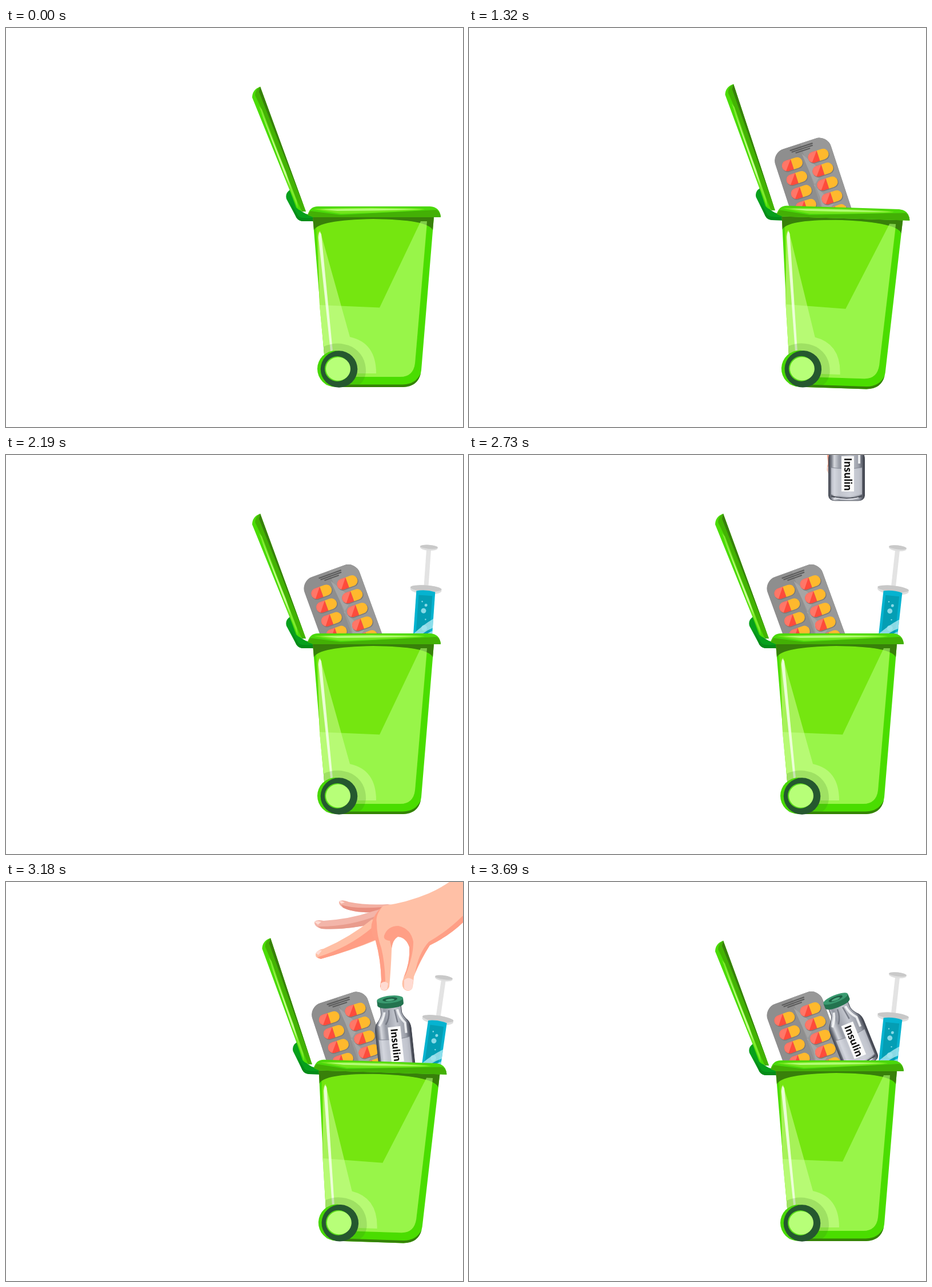
Recreate the animation shown at these times as an HTML page. Size 800 by 700 pixels, loop 3930 ms.

```html
<!DOCTYPE html>
<html lang="en">
<head>
<meta charset="utf-8">
<title>Medicine bin</title>
<style>
  html, body { margin: 0; width: 100%; height: 100%; overflow: hidden; background: #fff; }
  svg { display: block; width: 100%; height: 100%; }
  text { font: bold 17px "Open Sans", "Noto Sans", sans-serif; }
</style>
</head>
<body>
<svg viewBox="0 0 800 700">
  <defs>
    <linearGradient id="glass">
      <stop offset="0" stop-color="#3f434d"/>
      <stop offset=".08" stop-color="#7d818b"/>
      <stop offset=".16" stop-color="#d6d8de"/>
      <stop offset=".3" stop-color="#969aa4"/>
      <stop offset=".6" stop-color="#c3c6ce"/>
      <stop offset=".84" stop-color="#989ca6"/>
      <stop offset=".94" stop-color="#5d616c"/>
      <stop offset="1" stop-color="#33363f"/>
    </linearGradient>
    <clipPath id="blister"><rect x="-53" width="103" height="190" rx="22"/></clipPath>
    <g id="pill">
      <rect x="-18.500" y="-8" width="38" height="19" rx="9.500" fill="#7a7a7a"/>
      <path d="M0-9.500H-9A9.500 9.500 0 0 0-9 9.500H0Z" fill="#ff4b3b"/>
      <path d="M0-9.500H-9A9.500 9.500 0 0 0-14 8Z" fill="#ff7768"/>
      <path d="M0-9.500H9A9.500 9.500 0 0 1 9 9.500H0Z" fill="#ffb92d"/>
    </g>
  </defs>

  <g id="scene">
    <g id="pack">
      <g clip-path="url(#blister)">
        <path d="M-53 0H50V190H-53Z" fill="#8e8e8e"/>
        <path d="M0 0H50V190H0Z" fill="#989898"/>
        <path d="M-3 18L22 60 0 78 24 118 0 136 20 190H-8L4 100Z" fill="#a5a5a5"/>
      </g>
      <path d="M-20 6.500H20M-18 10H19M-12 13.500H13M-15 179H15" stroke="#5c5c5c" stroke-width="2.200" stroke-linecap="round"/>
      <g id="pills"></g>
    </g>

    <g id="hand"><g transform="rotate(-1.86 590 655)">
      <path d="M583 34Q588 30 600 35Q630 41 668 39L690 42 650 53Q610 55 590 45Q582 40 583 34Z" fill="#f3b0a2"/>
      <path d="M587 40Q610 48 660 44L650 53Q610 55 590 45Z" fill="#e88e7f"/>
      <path d="M540 70Q544 65 556 68Q602 65 640 52L672 43 645 73Q592 85 552 82Q539 78 540 70Z" fill="#f3b5a9"/>
      <path d="M545 78Q600 79 652 58L645 73Q592 85 552 82Z" fill="#e99c8d"/>
      <path d="M542 126Q545 119 556 117Q602 97 640 66L672 60 648 102Q602 121 551 135Q541 134 542 126Z" fill="#ffbfa5"/>
      <path d="M545 132Q600 115 641 80L652 99Q602 121 551 135Z" fill="#ff9d84"/>
      <path d="M660 42Q702 36 740 20Q760 11 776 0L870-70V22L800 71Q775 95 742 111Q724 140 714 166Q713 180 711 187Q704 195 696 187Q691 180 696 168Q708 140 706 114Q700 97 686 96Q676 102 675 120Q674 150 671 184Q666 194 657 189Q653 183 657 172Q656 136 647 103Q641 91 640 74Q645 54 660 42Z" fill="#ffc0a6"/>
      <path d="M640 74Q637 90 647 103Q656 136 657 172L655 184Q661 187 664 174Q663 140 657 116Q649 94 649 72Q646 58 660 42Q644 55 640 74Z" fill="#ff9f86"/>
      <path d="M662 94Q668 77 687 77Q709 82 713 105Q713 130 700 162L696 168Q708 140 706 114Q700 97 686 96Q677 101 675 116L672 103Q660 102 662 94Z" fill="#ff9f86"/>
      <path d="M870 8V22L800 71Q775 95 742 111Q727 133 716 160Q722 125 740 105Q773 86 800 59Z" fill="#ff9f86"/>
      <path d="M656 178Q663 172 669 178L667 188Q660 193 656 187ZM697 172Q704 165 713 172L711 187Q704 194 697 187ZM542 125Q546 119 553 120L547 128ZM540 70Q545 67 552 70L546 75ZM583 34Q587 32 593 36L587 38Z" fill="#ffdbd2"/>
    </g></g>

    <g id="syringe">
      <path d="M0-48V0" stroke="#b5b5b5" stroke-width="2"/>
      <path d="M-4-258H4V-185H-4Z" fill="#e3e3e3"/>
      <ellipse cy="-259" rx="15.500" ry="5" fill="#dedede"/>
      <ellipse cy="-260.500" rx="15.500" ry="3.500" fill="#c9c9c9"/>
      <ellipse cy="-185" rx="27.500" ry="8" fill="#dedede"/>
      <ellipse cy="-187.500" rx="27.500" ry="5.500" fill="#c8c8c8"/>
      <path d="M-10.500-61H10.500V-49L7-45H-7L-10.500-49Z" fill="#35e2f0"/>
      <path d="M-16.500-182Q0-186 16.500-182V-57Q0-54-16.500-57Z" fill="#05b3d0"/>
      <path d="M-12-175H12V-61H-12Z" fill="#049eb4"/>
      <path d="M-16.500-106Q0-124 16.500-135V-119Q0-111-16.500-91ZM-16.500-87Q0-105 16.500-114V-100Q0-92-16.500-75Z" fill="#b9edf4" opacity=".75"/>
      <g id="bubbles" fill="#9fe4ef" opacity=".85"></g>
    </g>

    <g id="vial">
      <path d="M-18 6H18V21Q20 29 27 36Q31.500 42 31.500 51V114Q31 123 20 123H-20Q-31 123-31.500 114V51Q-31.500 42-27 36Q-20 29-18 21Z" fill="url(#glass)" stroke="#4b4f59"/>
      <path d="M-27 65Q0 69 27 65V112Q0 119-27 112Z" fill="#d3d6de" opacity=".7"/>
      <path d="M-27 65Q0 69 27 65" fill="none" stroke="#868a95"/>
      <path d="M-12 18Q-15 31-24 41M11 15Q13 30 22 40V58" fill="none" stroke="#f8f9fb" stroke-width="4" opacity=".85"/>
      <path d="M-4 15Q-4 29-12 40M6 15L9 38" fill="none" stroke="#60646f" stroke-width="2.500" opacity=".7"/>
      <path d="M-27 115Q0 123 27 115" fill="none" stroke="#4b4f59" stroke-width="2.500"/>
      <path d="M-21 118Q0 123 21 118" fill="none" stroke="#e7e9ef" stroke-width="1.500"/>
      <path d="M-9 45H13V107H-9Z" fill="#fafafa"/>
      <text transform="translate(-4.500 48) rotate(90)" fill="#111">Insulin</text>
      <path d="M-23-3V6Q-20 12 0 12T23 6V-3Z" fill="#23734f"/>
      <ellipse cy="-3.500" rx="23" ry="6.500" fill="#3a9a70"/>
      <ellipse cy="-3.500" rx="13" ry="3.600" fill="#1c5f43"/>
      <ellipse cy="-2.500" rx="8" ry="2" fill="#4fae83"/>
    </g>

    <g id="bin">
      <path d="M497 284Q488 290 491 300L508 332Q512 339 520 339H538V328Q522 328 514 318Z" fill="#07a01c"/>
      <path d="M497 305L512 330Q516 335 538 333V339H520Q512 339 508 332Z" fill="#058c18"/>
      <path d="M445 103Q431 108 431 122L496 283 508 315Q514 322 525 322Z" fill="#4bdc05"/>
      <path d="M445 103Q436 108 436 118L447 141 508 300 518 322H525Z" fill="#43b303"/>
      <path d="M445 103L522 314 518 304 443 112Z" fill="#37800a"/>
      <path d="M443 137L448 143 509 303 511 316 495 278Z" fill="#7eea2d"/>
      <path d="M446 146L490 253 499 281 487 255Z" fill="#c4ff8f"/>

      <path d="M537 332L557 572 560 604Q562 630 585 630H695Q724 628 727 600L749 332Z" fill="#4add00"/>
      <path d="M580 630H695Q721 629 726 606Q717 625 695 625.500H600Z" fill="#358305"/>
      <path d="M543 350Q560 335 643 335Q715 336 737 345L716 588Q713 612 690 612H575L557 572 549 486Z" fill="#75e610"/>
      <path d="M537 332H749L747 355Q740 336 643 335Q546 337 539 355Z" fill="#38800a"/>
      <path d="M726 339H737L716 588Q713 612 690 612H575L557 572 549 486 654 490.500Z" fill="#b0ff70" opacity=".6"/>
      <path d="M546 366Q547 356 550 356L602 542Q648 552 648 606H575L557 572 549 486Z" fill="#d8ffa0" opacity=".5"/>
      <path d="M547 368Q548 352 552 362L572 567H568Z" fill="#f4ffe8" opacity=".88"/>
      <path d="M556 559Q580 548 605 559Q630 573 630 603Q628 622 615 627H560Z" fill="#3d7d1e" opacity=".2"/>

      <path d="M528 328Q532 313 546 313H742Q760 314 761 332H538Z" fill="#4bd80a"/>
      <path d="M528 328L533 321 586 328 754 319Q761 324 761 332H538Z" fill="#43b005"/>
      <path d="M539 318Q560 315 640 315T733 318Q725 321 586 326Z" fill="#72e51c"/>
      <path d="M550 318Q640 315 728 318Q650 321 580 321Z" fill="#b3fc75"/>

      <circle cx="577" cy="598" r="32" fill="#47d803"/>
      <circle cx="583" cy="598.500" r="32.300" fill="#25582f"/>
      <circle cx="580" cy="598" r="22" fill="#58dd18"/>
      <ellipse cx="581.500" cy="598" rx="21.500" ry="20.500" fill="#b7ff78"/>
    </g>
  </g>
</svg>
<script>
const LOOP = 3930, STEP = 30;
const el = Object.fromEntries(["scene", "pack", "hand", "syringe", "vial"]
  .map(id => [id, document.getElementById(id)]));

let pills = "";
for (let row = 0; row < 6; row++)
  for (const x of [-24.5, 23.5]) pills += `<use href="#pill" x="${x}" y="${30.5 + row * 25.6}"/>`;
document.getElementById("pills").innerHTML = pills;

document.getElementById("bubbles").innerHTML =
  [[-1.5, -148, 4.5], [2, -158, 2.5], [-5, -164, 1.3], [1.7, -118, 5], [-2.6, -99, 4.5],
   [2.2, -81, 2.5], [-3.5, -74, 1.8], [3, -133, 1.2]]
    .map(([x, y, r]) => `<circle cx="${x}" cy="${y}" r="${r}"/>`).join("");

// Linear track through [time, ...values] keys.
function track(keys, t) {
  const i = keys.findIndex(k => k[0] > t);
  if (i === 0) return keys[0].slice(1);
  if (i < 0) return keys[keys.length - 1].slice(1);
  const a = keys[i - 1], b = keys[i], u = (t - a[0]) / (b[0] - a[0]);
  return a.slice(1).map((v, n) => v + (b[n + 1] - v) * u);
}

// Share of an ease-out still to go, 1 to 0.
const left = (t, from, to, power) =>
  Math.min(1, Math.max(0, (to - t) / (to - from))) ** power;

function place(node, shown, x, y, angle = 0) {
  node.style.display = shown ? "" : "none";
  node.setAttribute("transform", `translate(${x} ${y}) rotate(${angle})`);
}

const wobble = [[-60, 0], [0, 1.86], [60, -1], [120, 0]];
const vialKeys = [[3030, 661, 165, 0], [3120, 661, 206, -2], [3180, 658, 207, -8], [3300, 643, 208, -22]];
const handKeys = [[3030, -13, 53], [3150, 0, 0], [3600, 0, 0], [3690, 0, -200]];

function draw() {
  const t = Math.floor(performance.now() % LOOP / STEP) * STEP;
  const tilt = [1320, 2250, 3180].reduce((sum, hit) => sum + track(wobble, t - hit)[0], 0);
  el.scene.setAttribute("transform", `rotate(${tilt} 590 655)`);

  place(el.pack, t >= 1050, 565, 203 - 353 * left(t, 1050, 1260, 1.3), -20);

  const [lean] = track([[1860, 1.3], [2460, 6.3]], t);
  place(el.syringe, t >= 1860, 722, 421 - 377 * left(t, 1860, 2190, 3), lean);

  const lift = 208 * left(t, 2730, 2910, 1.5);
  const [vx, vy, turn] = track(vialKeys, t);
  place(el.vial, t >= 2730, vx, vy - lift, turn);

  const [hx, hy] = track(handKeys, t);
  place(el.hand, t >= 2730 && t < 3690, hx, hy - lift);

  requestAnimationFrame(draw);
}
draw();
</script>
</body>
</html>
```
